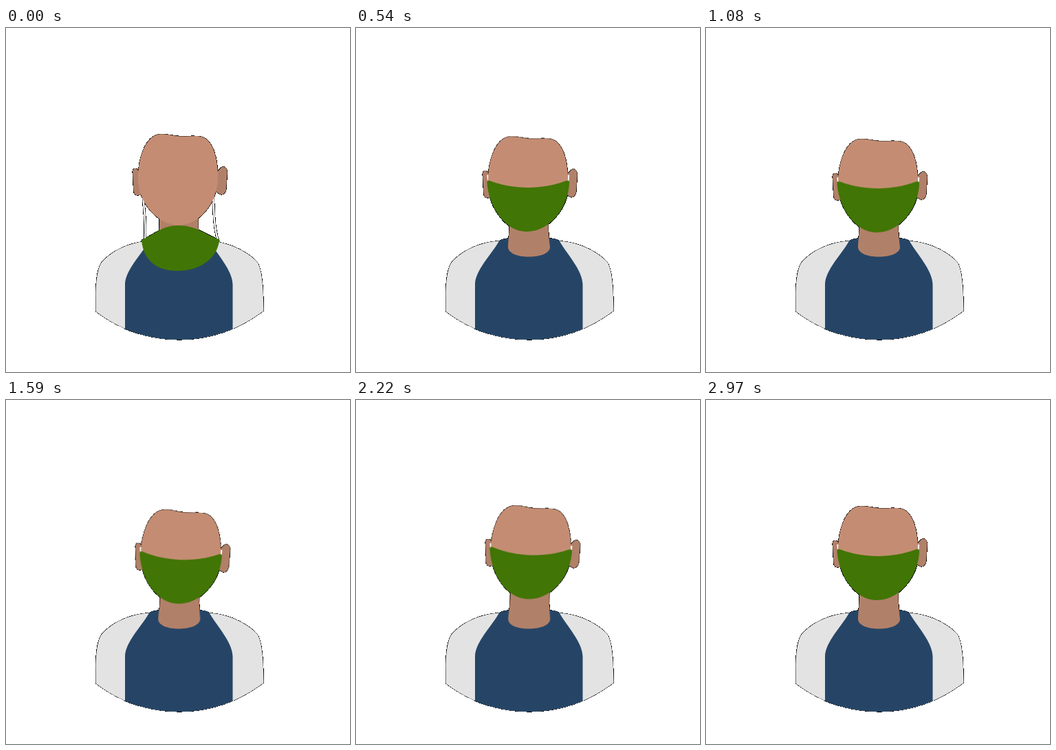
Recreate the animation shown at these times as an HTML page. Size 500 by 500 pixels, loop 3.15 s.

```html
<!DOCTYPE html>
<html lang="en">
<head>
<meta charset="utf-8">
<title>Putting on a mask</title>
<style>
html, body { margin: 0; width: 100%; height: 100%; overflow: hidden; background: #fff; }
svg { display: block; width: 100vw; height: 100vh; }

.sleeves { fill: #e3e3e3; }
.shirt { fill: #264566; }
.skin { fill: #c48d73; }
.shade { fill: #b18069; }
.mask { fill: #417505; }
.string { fill: none; stroke: #fff; stroke-width: 2.4; }

/* Copy underneath, showing as a thin rim around the silhouette */
.rim path { stroke: #000; stroke-width: 1.2; shape-rendering: crispEdges; }
.rim .string { stroke-width: 3.8; }

.tilt, .nod, .lift, .neck, .mask, .string { animation: 3150ms linear infinite; }
.tilt { animation-name: tilt; transform-origin: 250px 222px; }
.nod { animation-name: nod; }
.lift { animation-name: lift; }
.neck { animation-name: lean; transform-origin: 251px 326px; }
.mask { animation-name: wear; }
.string.left { animation-name: pull-left; }
.string.right { animation-name: pull-right; }

@keyframes tilt {
  0%, 34.29% { transform: translateX(0) rotate(0deg); animation-timing-function: ease-in; }
  50.48% { transform: translateX(4px) rotate(2deg); animation-timing-function: ease-out; }
  59% { transform: translateX(6.2px) rotate(2.9deg); }
  61.9% { transform: translateX(6px) rotate(2.8deg); }
  78.1% { transform: translateX(2px) rotate(.95deg); animation-timing-function: ease-out; }
  94.29%, 100% { transform: translateX(0) rotate(0deg); }
}
@keyframes lean {
  0%, 34.29% { transform: skewX(0deg); animation-timing-function: ease-in; }
  50.48% { transform: skewX(-2deg); animation-timing-function: ease-out; }
  59%, 61.9% { transform: skewX(-3.4deg); }
  78.1% { transform: skewX(-1deg); animation-timing-function: ease-out; }
  94.29%, 100% { transform: skewX(0deg); }
}
@keyframes nod {
  0% { transform: translateY(0); animation-timing-function: ease-in-out; }
  34.29%, 40% { transform: translateY(7.2px); animation-timing-function: ease-in; }
  50.48% { transform: translateY(6px); }
  61.9% { transform: translateY(1px); animation-timing-function: ease-out; }
  66%, 100% { transform: translateY(0); }
}
@keyframes lift {
  0% { transform: translateY(0); animation-timing-function: ease-in-out; }
  17.14% { transform: translateY(5px); }
  34.29%, 40% { transform: translateY(6.2px); animation-timing-function: ease-in; }
  50.48% { transform: translateY(5.3px); }
  61.9% { transform: translateY(-2px); }
  78.1% { transform: translateY(-1px); }
  94.29%, 100% { transform: translateY(0); }
}
@keyframes wear {
  0% {
    d: path("M197 309 C197 308 197 308 198 307.5 C216 300 226 287 251 287 C277 287 289 300 309 307 C310 307.5 310 308 310 309 C307 335 282 353 249 353 C218 353 200 337 197 309 Z");
    animation-timing-function: ease-in-out;
  }
  17.14%, 100% {
    d: path("M190.5 221 C190 217 192 216 196 217.5 C228 230 272 230 304 217.5 C309 216 310.5 217 310 221 C308 258 281 291 248 291 C218 291 194 258 190.5 221 Z");
  }
}
@keyframes pull-left {
  0% { d: path("M199 240 C200 262 204 280 202 308"); animation-timing-function: ease-in-out; }
  17.14%, 100% { d: path("M191.5 210 C191.5 213 192 216 193 219"); }
}
@keyframes pull-right {
  0% { d: path("M301 240 C302 262 302 290 308 308"); animation-timing-function: ease-in-out; }
  17.14%, 100% { d: path("M309 210 C309 213 308.5 216 308 219"); }
}
</style>
</head>
<body>
<svg viewBox="0 0 500 500">
  <g id="person">
    <path class="sleeves" d="M130.500 412 V390 C130.500 365 134 346 140 339.500 C152 326 176 311.500 208 309.500 H296 C330 312 355 329 365 340 C372 350 374 375 374.500 411 C340 437 300 453 252 453 C205 453 165 438 130.500 412 Z"/>
    <path class="shirt" d="M208 309.500 C213 306 220 305.500 230 305.500 H275 C285 305.500 292 306 296 310 C306 328 329.500 352 329.500 373 V437.500 C305 447 282 453 252 453 C222 453 197 447 173 437.500 V373 C173 352 198 328 208 309.500 Z"/>
    <path class="shade neck" d="M223 270 V285 C223 300 221 308 221 319 C222 328 236 332.500 251 332.500 C267 332.500 281 328 282 319 C281 308 279.500 300 279.500 285 V270 Z"/>
    <g class="tilt">
      <g class="nod">
        <path class="shade" d="M193 209 C191 203 184 202 184 209 L185.500 236 Q186 244 192 243 L202 242 V209 Z"/>
        <path class="shade" d="M306 209 C311 207 312 201 316 201.500 C320 202 322 206 321.500 211 L320 235 Q318 243 312 242 L302 236 Z"/>
        <path class="string left" d="M191.500 210 C191.500 213 192 216 193 219"/>
        <path class="string right" d="M309 210 C309 213 308.500 216 308 219"/>
        <path class="skin" d="M192 218 C192 190 202 158 222 154.500 C236 153 244 158 260 157.500 C272 157 280 156 287 159 C301 165 308 189 308 216 C308 256 280 286.500 251 286.500 C222 286.500 192 256 192 218 Z"/>
      </g>
      <g class="lift">
        <path class="mask" d="M190.500 221 C190 217 192 216 196 217.500 C228 230 272 230 304 217.500 C309 216 310.500 217 310 221 C308 258 281 291 248 291 C218 291 194 258 190.500 221 Z"/>
      </g>
    </g>
  </g>
</svg>
<script>
const person = document.getElementById('person');
const rim = person.cloneNode(true);
rim.removeAttribute('id');
rim.setAttribute('class', 'rim');
person.before(rim);
</script>
</body>
</html>
```
